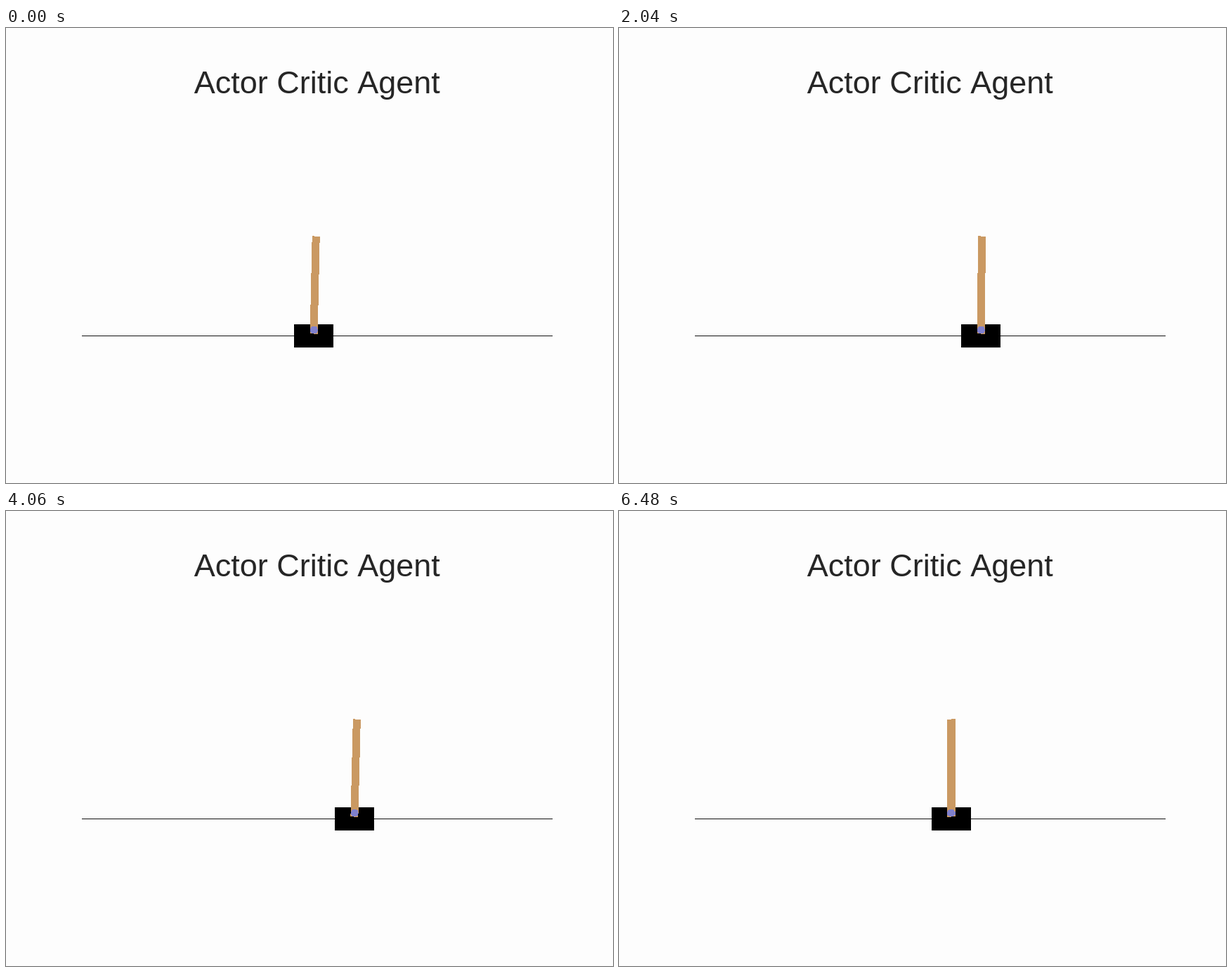
Write an HTML page that moves like this. It is 864 by 648 pixels and loops after 6.5 s.

```html
<!DOCTYPE html>
<html lang="en">
<head>
<meta charset="utf-8">
<title>Actor Critic Agent</title>
<style>
  html, body { margin: 0; width: 100%; height: 100%; overflow: hidden; background: #fdfdfd; }
  svg { display: block; width: 864px; height: 648px; }
  text {
    font: 45px "Liberation Sans", Arial, sans-serif;
    font-kerning: none;
    fill: #262626;
    text-anchor: middle;
  }
  path, rect { shape-rendering: crispEdges; }
</style>
</head>
<body>
<svg viewBox="0 0 864 648">
  <rect width="864" height="648" fill="#fdfdfd"/>
  <text x="442.8" y="93">Actor Critic Agent</text>
  <rect x="108" y="438" width="670" height="1" fill="#111"/>
  <path id="cart" fill="#000"/>
  <path id="pole" fill="#ca9962"/>
  <path id="axle" fill="#8080cc"/>
</svg>
<script>
const LOOP = 6500, STEP = 20;
// The scene is a 600 x 400 pixel picture, enlarged without smoothing.
const SCALE = 1.116, LEFT = 108, TOP = 103.9;
const AXLE_Y = 292.5;

// Key poses: time in ms, cart centre in scene pixels, pole angle in radians.
const poses = [
  [0, 295.7, .025], [1000, 315.7, .009], [2040, 364.85, .009], [2800, 400.1, -.068],
  [3540, 377.75, -.0245], [3960, 352.6, .02], [4680, 326.2, .038],
  [5000, 327, -.01], [5800, 321.2, .005], [6480, 327.05, -.003]
];

// Smooth curve through one column of the poses.
function curve(col, t) {
  const last = poses.length - 1;
  const gap = i => poses[i + 1][0] - poses[i][0];
  const rise = i => (poses[i + 1][col] - poses[i][col]) / gap(i);
  const slope = i => i === 0 ? rise(0) / 2 : i === last ? 0
    : (rise(i - 1) * gap(i) + rise(i) * gap(i - 1)) / (gap(i - 1) + gap(i));
  let i = 0;
  while (i < last - 1 && t >= poses[i + 1][0]) i++;
  const d = gap(i), u = (t - poses[i][0]) / d, w = 1 - u;
  return poses[i][col] * (1 + 2 * u) * w * w + poses[i + 1][col] * u * u * (3 - 2 * u)
    + d * u * w * (slope(i) * w - slope(i + 1) * u);
}

const sx = x => Math.round(LEFT + x * SCALE);
const sy = y => Math.round(TOP + y * SCALE);

// Fill a convex polygon row by row on the coarse pixel grid.
function raster(points) {
  const ys = points.map(p => p[1]);
  const end = Math.round(Math.max(...ys));
  let path = "";
  for (let row = Math.round(Math.min(...ys)); row < end; row++) {
    const y = row + .5, hits = [];
    points.forEach(([ax, ay], i) => {
      const [bx, by] = points[(i + 1) % points.length];
      if ((ay <= y) !== (by <= y)) hits.push(ax + (bx - ax) * (y - ay) / (by - ay));
    });
    if (hits.length < 2) continue;
    const l = Math.round(Math.min(...hits)), r = Math.round(Math.max(...hits));
    if (r > l) path += `M${sx(l)} ${sy(row)}H${sx(r)}V${sy(row + 1)}H${sx(l)}Z`;
  }
  return path;
}

const box = (l, t, r, b) => [[l, t], [r, t], [r, b], [l, b]];
const set = (id, points) => document.getElementById(id).setAttribute("d", raster(points));

function draw(ms) {
  const t = Math.floor(ms % LOOP / STEP) * STEP;
  const x = curve(1, t), angle = curve(2, t);
  const c = Math.cos(angle), s = Math.sin(angle);
  const turn = ([px, py]) => [x + px * c - py * s, AXLE_Y + px * s + py * c];

  set("cart", box(x - 25, 285, x + 25, 315));
  set("pole", box(-5, -120, 5, 5).map(turn));
  set("axle", Array.from({ length: 30 }, (_, i) => {
    const k = i * Math.PI / 15;
    return [x + 5 * Math.cos(k), AXLE_Y + 5 * Math.sin(k)];
  }));
}

let start;
function tick(now) {
  start ??= now;
  draw(now - start);
  requestAnimationFrame(tick);
}
draw(0);
requestAnimationFrame(tick);
</script>
</body>
</html>
```
